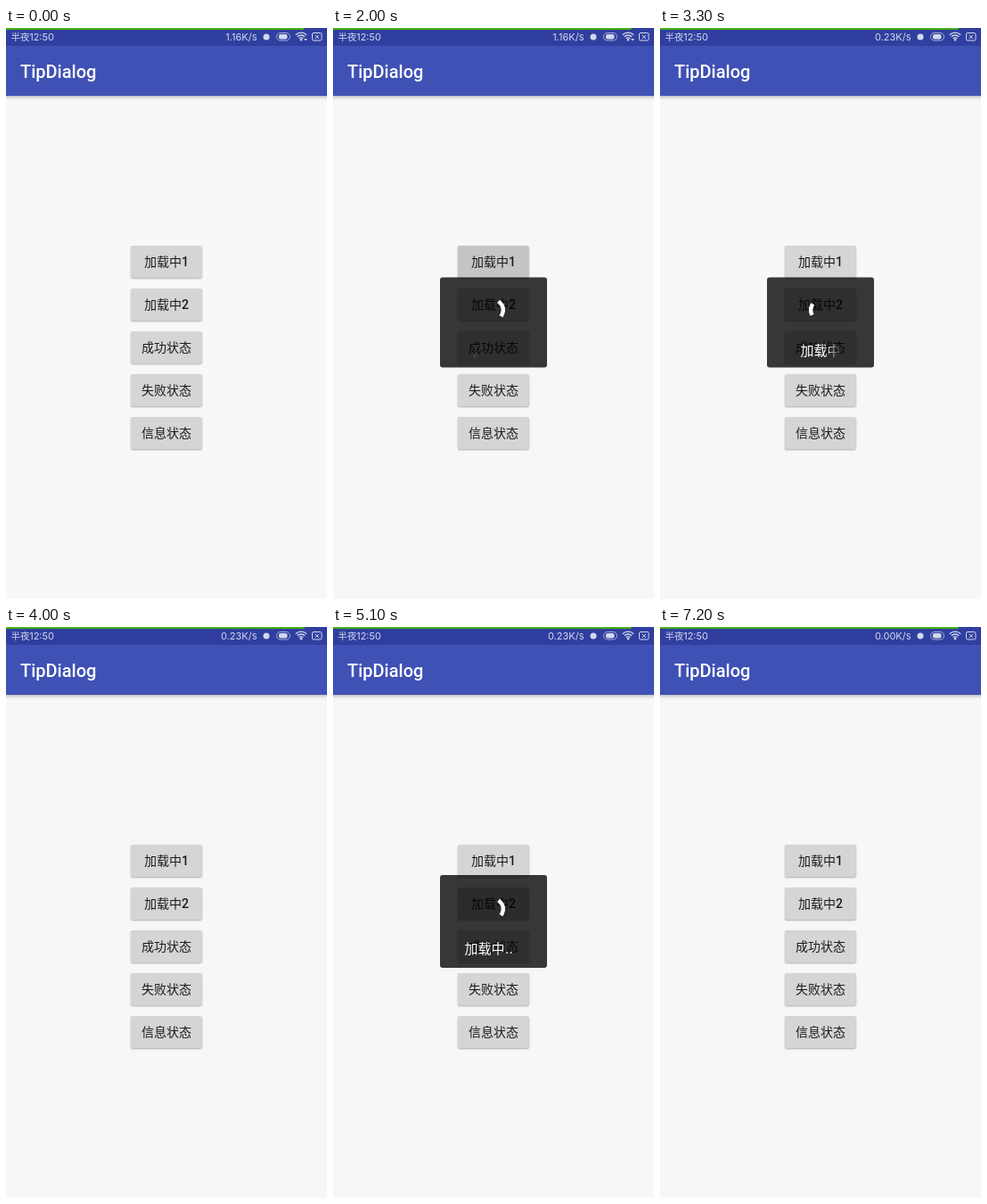
An HTML page with a canvas for the animation above (7600 ms loop, 360 px wide and 640 px high).

```html
<!DOCTYPE html>
<html lang="zh">
<head>
<meta charset="utf-8">
<title>TipDialog</title>
<style>
html, body { margin: 0; width: 100%; height: 100%; overflow: hidden; background: #f7f7f7; }
canvas { display: block; width: 360px; height: 640px; }
</style>
</head>
<body>
<canvas id="stage" width="360" height="640"></canvas>
<script>
const ctx = document.getElementById('stage').getContext('2d');
const LOOP = 7600, STEP = 100;
const CJK = '"Noto Sans CJK SC", "Noto Sans CJK", sans-serif';
const ICON = '#d3d8ef';
const BUTTONS = [['加载中', '1'], ['加载中', '2'], ['成功状态', ''], ['失败状态', ''], ['信息状态', '']];
const PRESSES = [{ button: 0, at: 1700 }, { button: 1, at: 4800 }];
const DIALOGS = [
  { from: 1900, to: 4000, top: 279.5, height: 101, label: drawRevealLabel },
  { from: 5000, to: 7200, top: 278, height: 104, label: drawDotsLabel }
];

const clamp = (v, lo = 0, hi = 1) => Math.min(hi, Math.max(lo, v));
const rad = deg => deg * Math.PI / 180;

function text(str, x, y, font, color, align = 'left') {
  ctx.font = font;
  ctx.fillStyle = color;
  ctx.textAlign = align;
  ctx.fillText(str, x, y);
}

function box(x, y, w, h, r, color) {
  ctx.beginPath();
  ctx.roundRect(x, y, w, h, r);
  ctx.fillStyle = color;
  ctx.fill();
}

function shadow(color, blur, dy) {
  ctx.shadowColor = color;
  ctx.shadowBlur = blur;
  ctx.shadowOffsetY = dy;
}

function drawStatusIcons(receiving) {
  ctx.fillStyle = ctx.strokeStyle = ICON;
  ctx.lineWidth = 1;
  ctx.beginPath();
  ctx.arc(292, 10, 3.5, 0, 7);
  ctx.fill();

  ctx.beginPath();
  ctx.roundRect(303.5, 5.5, 15, 8.5, 4.2);
  ctx.globalAlpha = 0.7;
  ctx.stroke();
  ctx.globalAlpha = 1;
  box(306, 7, 9.5, 5.5, 2, ICON);

  ctx.lineWidth = 1.3;
  for (const r of [3.2, 6, 8.8]) {
    ctx.beginPath();
    ctx.arc(331, 14, r, rad(-135), rad(-45));
    ctx.stroke();
  }
  ctx.beginPath();
  ctx.arc(331, 13.3, 1.2, 0, 7);
  ctx.fill();
  if (receiving) {
    ctx.beginPath();
    ctx.moveTo(334, 12); ctx.lineTo(338, 12); ctx.lineTo(336, 14.5);
    ctx.fill();
  }

  ctx.lineWidth = 1;
  ctx.beginPath();
  ctx.roundRect(343.5, 5.5, 10.5, 8.5, 1.5);
  ctx.moveTo(346.7, 7.7); ctx.lineTo(351, 12);
  ctx.moveTo(351, 7.7); ctx.lineTo(346.7, 12);
  ctx.stroke();
}

function drawHeader(t) {
  ctx.save();
  shadow('rgba(0,0,0,.34)', 4, 1);
  ctx.fillStyle = '#3f51b5';
  ctx.fillRect(-10, 0, 380, 76);
  ctx.restore();
  ctx.fillStyle = '#303f9f';
  ctx.fillRect(0, 0, 360, 20);
  ctx.fillStyle = '#43b117';
  ctx.fillRect(0, 0, 334.5, 2);

  const speed = t < 3000 ? '1.16' : t < 6900 ? '0.23' : '0.00';
  text('半夜', 5.5, 14, '10.5px ' + CJK, ICON);
  text('12:50', 54, 14, '11px Inter, sans-serif', ICON, 'right');
  text(speed + 'K/s', 281.5, 14, '11px Inter, sans-serif', ICON, 'right');
  drawStatusIcons(t < 3000);
  text('TipDialog', 16, 55.5, '500 20px Roboto, sans-serif', '#fff');
}

function drawButton([label, digit], index, t) {
  const y = 244 + index * 48;
  const press = PRESSES.find(p => p.button === index);
  const age = press ? t - press.at : -1;
  const lifted = age >= 0 && age < 200;
  const ripple = age >= 200 ? clamp((700 - age) / 400) * 0.08 : 0;

  ctx.save();
  shadow('rgba(0,0,0,.3)', lifted ? 4 : 2, lifted ? 1.5 : 1);
  box(140, y, 79.7, 36, 2, '#d5d5d5');
  ctx.restore();
  if (ripple) box(140, y, 79.7, 36, 2, `rgba(0,0,0,${ripple})`);

  const left = 180 - (label.length * 14 + (digit ? 8 : 0)) / 2;
  text(label, left, y + 23, '14px ' + CJK, '#1c1c1c');
  text(digit, left + 42, y + 23, '500 14px Roboto, sans-serif', '#1c1c1c');
}

// Eases with control points (0.2, 0) and (0.1, 1), finishing at x = 0.5.
function trimEase(x) {
  if (x <= 0) return 0;
  if (x >= 0.5) return 1;
  let lo = 0, hi = 1;
  for (let i = 0; i < 20; i++) {
    const s = (lo + hi) / 2, u = 1 - s;
    if (0.6 * u * u * s + 0.3 * u * s * s + 0.5 * s * s * s < x) lo = s; else hi = s;
  }
  return lo * lo * (3 - 2 * lo);
}

function drawSpinner(age) {
  const time = age + 80;
  const p = time % 1333 / 1333;
  const base = -90 + time * 720 / 4444 + p * 90;
  const start = base + 270 * trimEase(p - 0.5);
  const end = base + 270 * trimEase(p);
  ctx.beginPath();
  ctx.arc(180, 316, 10.9, rad(start), rad(Math.max(end, start + 1)));
  ctx.lineWidth = 4.4;
  ctx.lineCap = 'square';
  ctx.strokeStyle = '#fff';
  ctx.stroke();
  ctx.lineCap = 'butt';
}

function drawRevealLabel(age) {
  const edge = 150 + age * 0.032;
  const fade = ctx.createLinearGradient(edge - 10, 0, edge + 10, 0);
  fade.addColorStop(0, '#fff');
  fade.addColorStop(1, 'rgba(255,255,255,0)');
  text('加载中', 157.5, 367, '15px ' + CJK, fade);
}

function drawDotsLabel(age) {
  const dots = (2 + Math.floor(age / 300)) % 4;
  text('加载中', 147.5, 366, '15px ' + CJK, '#fff');
  text('.'.repeat(dots), 193, 366, '17px Roboto, sans-serif', '#fff');
}

function drawDialog(d, t) {
  if (t < d.from || t >= d.to) return;
  const age = t - d.from;
  ctx.save();
  ctx.globalAlpha = clamp((age + 50) / 100) * clamp((d.to - t) / 200);
  box(120, d.top, 120, d.height, 3, 'rgba(0,0,0,.775)');
  drawSpinner(age);
  d.label(age);
  ctx.restore();
}

function render(t) {
  ctx.fillStyle = t < 900 ? '#f7f9f8' : '#f7f7f7';
  ctx.fillRect(0, 0, 360, 640);
  drawHeader(t);
  BUTTONS.forEach((b, i) => drawButton(b, i, t));
  DIALOGS.forEach(d => drawDialog(d, t));
}

const began = performance.now();
function tick() {
  const t = (performance.now() - began) % LOOP;
  render(Math.floor(t / STEP) * STEP);
  requestAnimationFrame(tick);
}
tick();
</script>
</body>
</html>
```
